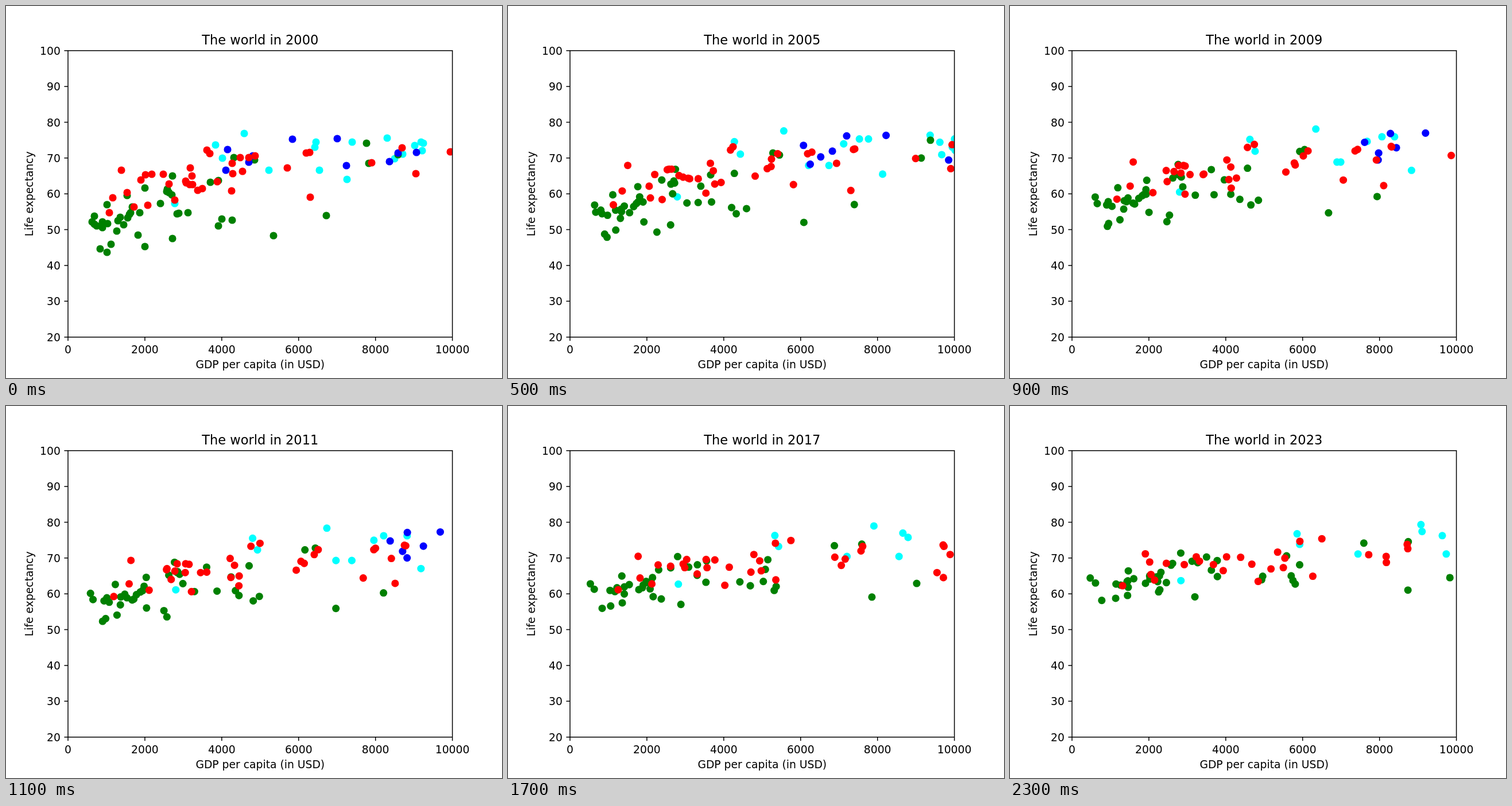
Animation, 864 px wide and 648 px high, one loop 2400 ms. Source, as an HTML page:

```html
<!DOCTYPE html>
<html lang="en">
<meta charset="utf-8">
<title>Life expectancy and income</title>
<style>
  html, body { margin: 0; width: 100%; height: 100%; overflow: hidden; background: #fff }
  svg { display: block; width: 864px; height: 648px; font: 18.75px "DejaVu Sans", sans-serif }
  path { fill: none; stroke: #000; stroke-width: 1.5 }
</style>
<svg viewBox="0 0 864 648">
  <clipPath id="area"><rect x="108" y="77.75" width="669.6" height="499"/></clipPath>
  <g id="dots" clip-path="url(#area)"></g>
  <path id="axes"/>
  <g id="labels"></g>
</svg>
<script>
const LEFT = 108, RIGHT = 777.6, TOP = 77.76, BOTTOM = 576.72;
const YEARS = 24, STEP = 100;
const dotLayer = document.getElementById('dots');
const labels = document.getElementById('labels');
const tracks = [];

function make(parent, name, attrs) {
  const el = document.createElementNS('http://www.w3.org/2000/svg', name);
  for (const key in attrs) el.setAttribute(key, attrs[key]);
  return parent.appendChild(el);
}

function label(text, x, y, anchor = 'middle', more = {}) {
  const el = make(labels, 'text', { x, y, 'text-anchor': anchor, ...more });
  el.textContent = text;
  return el;
}

// Dots start at the given x, y pairs, listed from slowest to fastest income growth.
// growth: maps the rank, -1 to 1, to the income factor over the whole span.
// health: maps the first height to the last one.
function region(fill, growth, health, starts) {
  const last = starts.length / 2 - 1;
  for (let i = 0; i <= last; i++) {
    const x = starts[2 * i], y = starts[2 * i + 1];
    const dx = (x - LEFT) * (growth(2 * i / last - 1) - 1);
    const dot = make(dotLayer, 'circle', { r: 6.56, fill });
    tracks.push({ dot, x, y, dx, dy: health(y) - y });
  }
}

region('cyan', r => 1.5 + .2 * r + .28 * r ** 3, y => .8 * y + 29,
  [294,344, 546,286, 603,237, 712,243, 725,252, 723,237, 727,239, 377,265, 538,246,
   365,242, 594,302, 664,230, 677,266, 691,258, 540,237, 458,286, 415,222]);

region('green', r => 1.39 + .3 * r + .2 * r ** 2 + .6 * r ** 3, y => .62 * y + 72.7,
  [154,366, 176,429, 290,405, 154,380, 356,307, 284,325, 290,296, 233,360, 195,374,
   193,392, 199,368, 281,319, 376,371, 230,399, 280,323, 183,415, 212,369, 205,381,
   298,362, 394,373, 164,423, 215,363, 220,350, 217,360, 168,386, 370,304, 176,346,
   558,365, 370,383, 269,344, 158,383, 433,268, 242,419, 466,400, 211,330, 301,361,
   632,274, 317,360, 242,317, 628,239, 397,264, 683,259, 289,329, 150,376, 177,379,
   168,376]);

region('blue', r => 2.6 + .5 * r + .3 * r ** 3, y => .7 * y + 50,
  [577,231, 499,232, 668,271, 683,256, 715,255, 593,278, 423,272, 430,261, 386,250, 383,286]);

region('red', r => 1.74 + .28 * r + .8 * r ** 3, y => .75 * y + 43,
  [313,305, 314,308, 320,311, 247,347, 325,311, 180,360, 274,293, 201,286, 714,292,
   774,254, 334,321, 342,318, 355,257, 637,273, 690,247, 321,282, 412,288, 324,296,
   530,333, 235,303, 186,334, 284,310, 350,251, 529,255, 254,293, 523,256, 395,292,
   408,264, 490,282, 394,274, 368,306, 243,294, 294,338, 434,261, 423,264, 211,325,
   393,322, 223,350]);

let axes = `M${LEFT} ${TOP}H${RIGHT}V${BOTTOM}H${LEFT}Z`;
for (let v = 0; v <= 10000; v += 2000) {
  const x = LEFT + (RIGHT - LEFT) * v / 10000;
  axes += `M${x} ${BOTTOM}v6.56`;
  label(v, x, 604.5);
}
for (let v = 20; v <= 100; v += 10) {
  const y = BOTTOM - (BOTTOM - TOP) * (v - 20) / 80;
  axes += `M${LEFT} ${y}h-6.56`;
  label(v, 94.9, y + 7, 'end');
}
document.getElementById('axes').setAttribute('d', axes);
label('GDP per capita (in USD)', 442.8, 631);
label('Life expectancy', 0, 0, 'middle', { transform: 'translate(47.3 327.2) rotate(-90)' });
const title = label('', 442.8, 66.5, 'middle', { 'font-size': 22.5 });

function draw(now) {
  const year = Math.floor(now / STEP) % YEARS;
  const part = year / (YEARS - 1);
  const eased = 1 - (1 - part) ** 1.4; // health gains slow down over time
  title.textContent = `The world in ${2000 + year}`;
  for (const { dot, x, y, dx, dy } of tracks) {
    dot.setAttribute('cx', x + dx * part);
    dot.setAttribute('cy', y + dy * eased);
  }
}

const start = performance.now();
function loop() {
  draw(performance.now() - start);
  requestAnimationFrame(loop);
}
loop();
</script>
</html>
```
